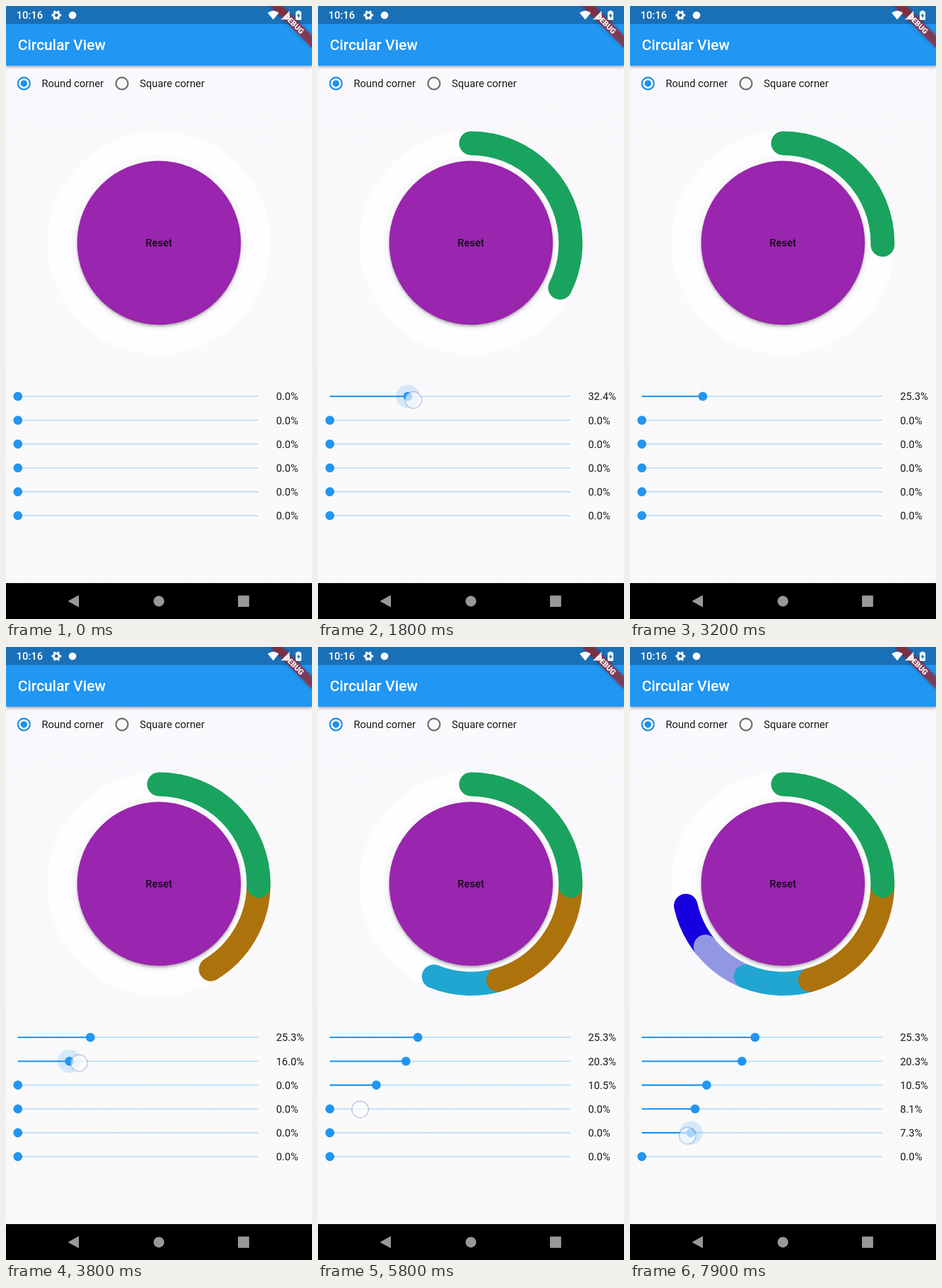
Animation, 529 px wide and 1058 px high, one loop 8 s. Source, as an HTML page:

```html
<!DOCTYPE html>
<html lang="en">
<head>
<meta charset="utf-8">
<title>Circular View</title>
<style>
  html, body { margin: 0; width: 100%; height: 100%; overflow: hidden; background: #faf9fc; }
  svg { display: block; width: 529px; height: 1058px; font: 18px Roboto, sans-serif; fill: #1d1d1f; }
  .medium { font-weight: 500; }
  .bar { fill: #2196f3; filter: drop-shadow(0 3px 2px rgba(0,0,0,.28)); }
  .button { fill: #9a25ae; filter: drop-shadow(0 3px 2px rgba(0,0,0,.3)); }
  .arc { fill: none; stroke-width: 41.2; stroke-linecap: round; }
  .rail { stroke: #c4e1f8; stroke-width: 2.6; }
  .fill { stroke: #2196f3; stroke-width: 2.6; }
  .thumb { fill: #2196f3; }
  .halo { fill: #2196f3; fill-opacity: .17; }
  .finger { fill: #fff; fill-opacity: .6; stroke: #8c8cc8; stroke-opacity: .45; stroke-width: 2; }
  .banner { fill: #b71c1c; fill-opacity: .627; filter: drop-shadow(0 0 3px rgba(0,0,0,.4)); }
</style>
</head>
<body>
<svg viewBox="0 0 529 1058">
  <defs>
    <linearGradient id="page" x2="0" y2="1">
      <stop stop-color="#f9f8fc"/><stop offset="1" stop-color="#fafafa"/>
    </linearGradient>
  </defs>
  <rect width="529" height="1058" fill="url(#page)"/>

  <rect class="bar" y="31" width="529" height="72"/>
  <rect width="529" height="31" fill="#1a70b7"/>
  <text class="medium" x="20.5" y="76.3" font-size="25.7" fill="#fff">Circular View</text>

  <g fill="none" stroke-width="2.6">
    <circle cx="31" cy="133.7" r="10.3" stroke="#1f8fe8"/>
    <circle cx="31" cy="133.7" r="5.8" fill="#1f8fe8"/>
    <circle cx="200.5" cy="133.7" r="10.3" stroke="#717173"/>
  </g>
  <text x="61.7" y="140">Round corner</text>
  <text x="231.3" y="140">Square corner</text>

  <circle cx="264.5" cy="409" r="172.2" fill="none" stroke="#fefdff" stroke-width="41.2"/>
  <g id="arcs" transform="rotate(-90 264.5 409)"></g>
  <circle class="button" cx="264.5" cy="408.7" r="141.5"/>
  <text class="medium" x="264.3" y="415.4" text-anchor="middle" fill="#150a18">Reset</text>

  <g id="rows"></g>
  <circle id="finger" class="finger" r="14.3"/>

  <rect y="996" width="529" height="62"/>
  <rect y="996" width="529" height="62" fill="#000"/>
  <g fill="#999">
    <path d="M107 1027.3L126 1016.8V1037.8Z"/>
    <circle cx="264.3" cy="1027.2" r="9.2"/>
    <rect x="401" y="1017.6" width="19.4" height="19.4" rx="1"/>
  </g>

  <g transform="translate(529) rotate(45)">
    <rect class="banner" x="-51.4" y="36" width="102.8" height="15.4"/>
    <text y="48.4" text-anchor="middle" font-size="13.1" font-weight="900" fill="#fff">DEBUG</text>
  </g>

  <g fill="#fff">
    <text class="medium" x="18" y="22.3" fill="#fff">10:16</text>
    <g fill="none" stroke="#fff">
      <circle cx="87.2" cy="15.8" r="4.7" stroke-width="3.6"/>
      <circle cx="87.2" cy="15.8" r="7.1" stroke-width="2.6" pathLength="12" stroke-dasharray="1" stroke-dashoffset=".5"/>
    </g>
    <circle cx="115" cy="16" r="6.5"/>
    <path d="M452.5 12Q462 4.5 471.5 12L462 23.5Z"/>
    <path d="M475 23.5L490.5 8V23.5Z" fill-opacity=".8"/>
    <path d="M503.7 7.8H507.7V9.6H510.5V24H500.8V9.6H503.7Z"/>
    <path d="M506.5 11.5L502.8 17.5H505.2V22L508.8 15.8H506.5Z" fill="#1a70b7"/>
  </g>
</svg>

<script>
const LOOP = 8000, STEP = 100;
const LEFT = 20.5, TRACK = 416;
const COLORS = ['#1aa35f', '#ac730c', '#21a6d2', '#9297e3', '#1600e0', '#c0392b'];

// Each drag: finger down at `start`, waits at the `down` positions, then sets one value per step.
const DRAGS = [
  { start: 600, end: 3200, down: [28, 28], y: [678, 682],
    values: [3, 6, 9, 12, 15, 18, 21, 24, 26.7, 29.5, 32.4, 34.7, 35.8, 36, 34.5, 32, 29.5, 27.5, 26.3, 25.6, 25.3] },
  { start: 3300, end: 4900, down: [30, 36], y: [716, 724],
    values: [4, 8, 12, 16, 19, 21.5, 23.5, 24.8, 25.3, 24.6, 23.3, 22.8, 20.3] },
  { start: 5200, end: 5700, down: [30], y: [757, 760], values: [3, 6.5, 9.5, 10.5] },
  { start: 5800, end: 6200, down: [73, 73], y: [798, 817], values: [7, 8.1] },
  { start: 7000, end: LOOP, down: [30], y: [840, 844],
    values: [2, 5.5, 8.2, 6.5, 4.1, 4.1, 6.3, 7.8, 7.3, 6.8] }
];

const byId = id => document.getElementById(id);

function add(parent, tag, attrs) {
  const el = document.createElementNS('http://www.w3.org/2000/svg', tag);
  set(el, attrs);
  return parent.appendChild(el);
}

function set(el, attrs) {
  for (const key in attrs) el.setAttribute(key, attrs[key]);
}

function show(el, on) {
  el.style.display = on ? '' : 'none';
}

const rows = COLORS.map((stroke, i) => {
  const y = 673.8 + i * 41.15, g = byId('rows');
  add(g, 'line', { class: 'rail', x1: LEFT, x2: LEFT + TRACK, y1: y, y2: y });
  return {
    fill: add(g, 'line', { class: 'fill', x1: LEFT, y1: y, y2: y }),
    halo: add(g, 'circle', { class: 'halo', cy: y, r: 20.3 }),
    thumb: add(g, 'circle', { class: 'thumb', cy: y, r: 7.8 }),
    label: add(g, 'text', { x: 467, y: y + 6.6 })
  };
});

// Earlier arcs lie on top of later ones.
const arcs = [];
for (let i = COLORS.length - 1; i >= 0; i--) {
  arcs[i] = add(byId('arcs'), 'circle', {
    class: 'arc', cx: 264.5, cy: 409, r: 172.2, pathLength: 100, stroke: COLORS[i]
  });
}

function stepOf(drag, time) {
  const step = Math.floor((time - drag.start) / STEP) - drag.down.length;
  return Math.min(step, drag.values.length - 1);
}

function render(time) {
  const values = COLORS.map((_, i) => {
    const drag = DRAGS[i];
    return drag ? drag.values[stepOf(drag, time)] || 0 : 0;
  });
  const total = values.reduce((a, b) => a + b, 0);
  const xOf = (i, v) => LEFT + TRACK * v / (100 - total + values[i]);
  const active = DRAGS.findIndex(d => time >= d.start && time < d.end);

  let from = 0;
  values.forEach((v, i) => {
    const { fill, halo, thumb, label } = rows[i], x = xOf(i, v);
    set(fill, { x2: x });
    set(thumb, { cx: x });
    set(halo, { cx: x });
    show(halo, i === active && v > 0);
    label.textContent = v.toFixed(1) + '%';
    set(arcs[i], { 'stroke-dasharray': v + ' 200', 'stroke-dashoffset': -from });
    show(arcs[i], v > 0);
    from += v;
  });

  const finger = byId('finger');
  show(finger, active >= 0);
  if (active < 0) return;
  const drag = DRAGS[active], step = stepOf(drag, time), list = drag.values;
  // The finger runs one step ahead of the thumb.
  const cx = step < 0 ? drag.down[step + drag.down.length]
                      : xOf(active, list[step + 1] ?? list[step]);
  const k = Math.max(step, 0) / (list.length - 1);
  set(finger, { cx, cy: drag.y[0] + (drag.y[1] - drag.y[0]) * k });
}

const begin = performance.now();
function tick() {
  const time = (performance.now() - begin) % LOOP;
  render(Math.floor(time / STEP) * STEP);
  requestAnimationFrame(tick);
}
tick();
</script>
</body>
</html>
```
